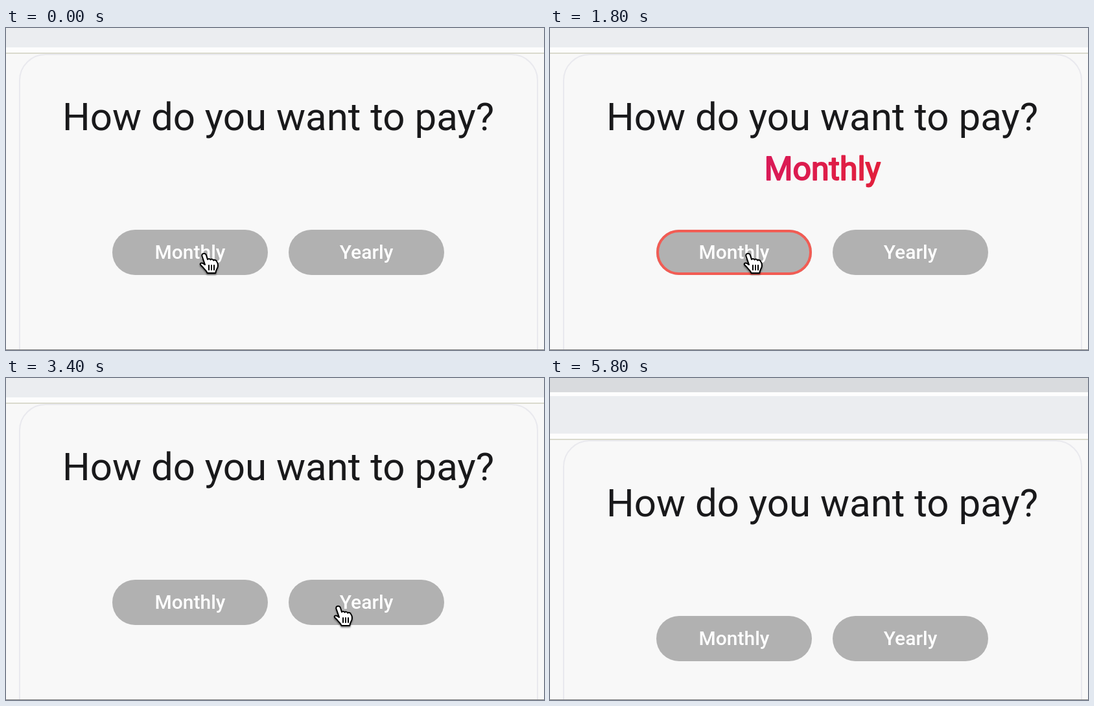
Write an HTML page that moves like this. It is 830x498 px and loops after 5900 ms.

```html
<!DOCTYPE html>
<html lang="en">
<head>
<meta charset="utf-8">
<title>How do you want to pay?</title>
<style>
  html, body { margin: 0; width: 100%; height: 100%; overflow: hidden; background: #f8f8f8; }
  svg { display: block; width: 830px; height: 498px; }
  text { font-family: Roboto, Arial, sans-serif; text-anchor: middle; }

  .title { font-size: 60px; fill: #19191b; }
  .label { font-size: 30px; font-weight: 500; fill: #fff; }
  .choice {
    font-size: 50px; fill: url(#red); stroke: url(#red);
    stroke-width: 2px; stroke-linejoin: round; opacity: 0;
  }
  .pill { fill: #b1b1b1; }
  .ring { fill: none; stroke: #f25c54; stroke-width: 4px; opacity: 0; }

  .page, .hand, .choice, .ring { animation: 5.9s linear infinite; }
  .page { animation-name: page; }
  .hand { animation-name: hand; }
  .choice { animation-timing-function: step-end; }
  .monthly .choice { animation-name: month-text; }
  .monthly .ring { animation-name: month-ring; }
  .yearly .choice { animation-name: year-text; }
  .yearly .ring { animation-name: year-ring; }

  @keyframes page {
    0%, 71.19% { transform: translateY(0); }
    74.5%, 100% { transform: translateY(56px); }
  }
  @keyframes hand {
    0% { transform: translate(298px, 347px); }
    33.05% { transform: translate(298px, 347px); animation-timing-function: ease-in; }
    35.59% { transform: translate(397px, 353px); animation-timing-function: ease-out; }
    39.83% { transform: translate(505px, 351px); }
    63.56% { transform: translate(505px, 351px); animation-timing-function: ease-in; }
    72.03%, 100% { transform: translate(840px, 50px); }
  }
  @keyframes month-text {
    0% { opacity: 0; }
    11.86% { opacity: 1; }
    31.36%, 100% { opacity: 0; }
  }
  @keyframes year-text {
    0% { opacity: 0; }
    41.53% { opacity: 1; }
    51.7%, 100% { opacity: 0; }
  }
  @keyframes month-ring {
    0%, 11.86% { opacity: 0; stroke: #777; }
    14.4% { opacity: 1; stroke: #b26055; }
    16.95%, 31.36% { opacity: 1; stroke: #f25c54; }
    35.5%, 100% { opacity: 0; stroke: #b26055; }
  }
  @keyframes year-ring {
    0%, 41.53% { opacity: 0; stroke: #777; }
    44.07% { opacity: 1; stroke: #b26055; }
    46.61%, 51.7% { opacity: 1; stroke: #f25c54; }
    56.78%, 100% { opacity: 0; stroke: #b26055; }
  }
</style>
</head>
<body>
<svg viewBox="0 0 830 498">
  <defs>
    <linearGradient id="red" gradientUnits="userSpaceOnUse" x1="330" y1="0" x2="510" y2="0">
      <stop offset="0" stop-color="#d91a58"/>
      <stop offset="1" stop-color="#e2203c"/>
    </linearGradient>
    <filter id="shade" x="-30%" y="-30%" width="160%" height="170%">
      <feDropShadow dx="0" dy="2" stdDeviation="1.3" flood-color="#000" flood-opacity=".45"/>
    </filter>
  </defs>

  <rect width="830" height="498" fill="#f8f8f8"/>
  <g class="page">
    <!-- header bands -->
    <rect y="-56" width="830" height="96" fill="#fdfdfd"/>
    <rect y="-56" width="830" height="22" fill="#d9dbde"/>
    <rect y="-28" width="830" height="58" fill="#ebedf0"/>
    <rect y="38" width="830" height="2" fill="#dadacd"/>
    <rect x="21" y="41" width="799" height="600" rx="40" fill="none" stroke="#e9e9ee" stroke-width="2"/>

    <text class="title" x="420" y="158">How do you want to pay?</text>

    <g class="monthly">
      <text class="choice" x="420.5" y="235">Monthly</text>
      <rect class="pill" x="164" y="312" width="240" height="70" rx="35"/>
      <rect class="ring" x="166" y="314" width="236" height="66" rx="33"/>
      <text class="label" x="284" y="357">Monthly</text>
    </g>
    <g class="yearly">
      <text class="choice" x="419.5" y="235">Yearly</text>
      <rect class="pill" x="436" y="312" width="240" height="70" rx="35"/>
      <rect class="ring" x="438" y="314" width="236" height="66" rx="33"/>
      <text class="label" x="556" y="357">Yearly</text>
    </g>
  </g>

  <rect y="497" width="830" height="1" fill="#838383"/>

  <g class="hand">
    <g filter="url(#shade)" stroke="#000" stroke-width="2" stroke-linejoin="round" stroke-linecap="round">
      <path fill="#fff" d="M6 2C8.500 1 10.500 2.500 11 4.500L13 11C13.500 9.500 17 9.500 17.500 11.500
        C18.500 10 21.500 10.300 22 12.500C23.500 11 26.500 12 27 14C28.500 16 29.500 19 28.500 23
        C27.500 26 25.500 28 25.300 32L12.500 32C12 29.500 9 27 7 24.500C5 21.500 2 20 1.700 18.500
        C1.500 16 5 15.500 8 18.500L9 19L4.500 6C4 4 4.500 2.500 6 2Z"/>
      <path fill="none" d="M15 20v7M19 20v7M23 20v7"/>
    </g>
  </g>
</svg>
</body>
</html>
```
